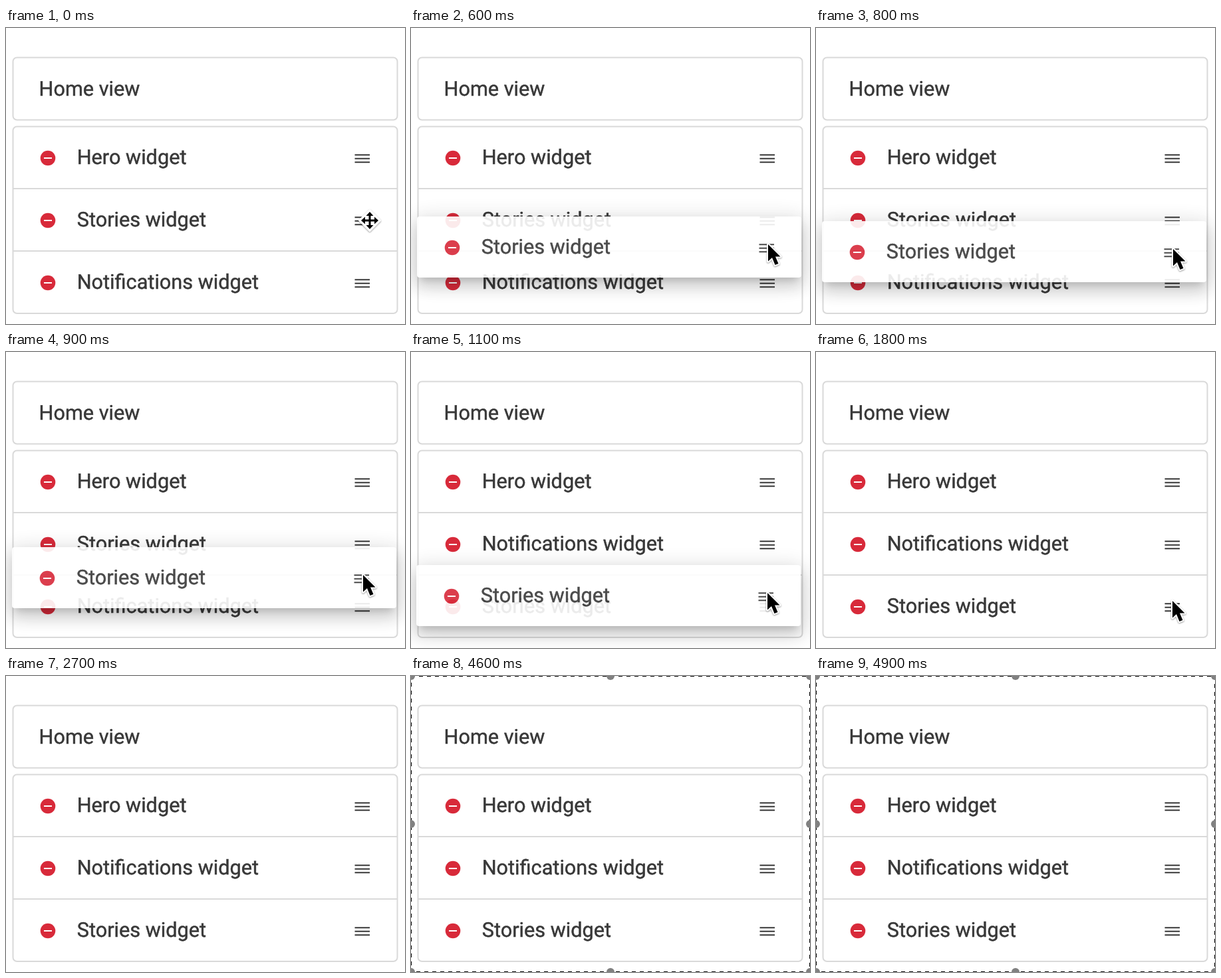
An HTML page that plays this animation: 600x446 px, repeating every 6300 ms.

```html
<!DOCTYPE html>
<html lang="en">
<head>
<meta charset="utf-8">
<title>Reordering widgets</title>
<style>
  html, body { margin: 0; width: 100%; height: 100%; overflow: hidden; background: #fff; }
  svg { display: block; width: 600px; height: 446px; }
  text {
    font: 30.7px Roboto, sans-serif; text-rendering: geometricPrecision;
    fill: #383838; stroke: #383838; stroke-width: .5;
  }
  .line { fill: none; stroke: #d9d9d9; stroke-width: 2; }
  .bars { fill: none; stroke: #383838; stroke-width: 2; }
  .dash { fill: none; stroke: #000; stroke-width: 2; stroke-dasharray: 6 6; }
</style>
</head>
<body>
<svg viewBox="0 0 600 446">
  <defs>
    <g id="controls">
      <circle cx="63" cy="47" r="11.300" fill="#d82a3a"/>
      <path d="M57 47h12" stroke="#fff" stroke-width="2"/>
      <path class="bars" d="M524.500 42.300h22.500M524.500 47.800h22.500M524.500 53.300h22.500"/>
    </g>
  </defs>

  <rect class="line" x="10.500" y="44.500" width="578" height="94" rx="6"/>
  <text x="49.500" y="101.500">Home view</text>
  <rect class="line" x="10.500" y="148.500" width="578" height="281.500" rx="6"/>
  <path class="line" d="M10.500 242h578M10.500 336h578"/>
  <g id="rows"></g>

  <g id="preview" opacity=".9">
    <g id="shadow"></g>
    <rect x="10" y="94" width="578" height="92" rx="4" fill="#fff"/>
  </g>

  <g id="move">
    <path d="M0-16L16 0 0 16-16 0z" fill="#fff" stroke="#fff" stroke-width="2"
      stroke-linejoin="round" style="filter:drop-shadow(0 1px 1px #0006)"/>
    <path d="M-9 0H9M0-9V9" stroke="#000" stroke-width="3"/>
    <g id="heads"></g>
  </g>
  <path id="arrow" d="M0 0V25.500L6 20 10.500 31 15.500 29 11 18.500H18.500Z" stroke="#fff"
    stroke-width="4" paint-order="stroke" stroke-linejoin="round"
    style="filter:drop-shadow(0 1px 1px #0006)"/>

  <g id="frame">
    <rect class="dash" width="600" height="446"/>
  </g>
</svg>
<script>
const LOOP = 6300, SWAP = 1100, DROP = 1200, FRAME = 4600;
const PITCH = 94, ROW_TOP = 149;
const GRAB = { x: 538, y: 285 };

// [time, dx, dy] of the held row
const DRAG = [
  [400, 0, 30], [500, 0, 36], [600, -1, 41], [700, -1, 45],
  [800, -1, 48], [900, -1, 51], [1000, -1, 54], [1100, -2, 78]
];

// [time, cursor, x, y]
const CURSOR = [
  [0, 'move', 547, 290], [100, 'move', 543, 288], [200, 'move', GRAB.x, GRAB.y],
  ...DRAG.map(([t, dx, dy]) => [t, 'arrow', GRAB.x + dx, GRAB.y + dy]),
  [1200, 'arrow', 536, 373], [1300, 'arrow', 536, 375],
  [2500, 'arrow', 541, 388], [2600, 'arrow', 553, 418], [2700, 'none', 0, 0]
];

const $ = id => document.getElementById(id);
const at = (steps, t) => steps.findLast(step => step[0] <= t);
const show = (el, on) => { el.style.display = on ? '' : 'none'; };
const place = (el, x, y) => el.setAttribute('transform', `translate(${x} ${y})`);

function add(parent, tag, attrs = {}, content = '') {
  const el = document.createElementNS('http://www.w3.org/2000/svg', tag);
  for (const [key, value] of Object.entries(attrs)) el.setAttribute(key, value);
  el.textContent = content;
  return parent.appendChild(el);
}

function addRow(parent, label, slot) {
  const row = add(parent, 'g');
  add(row, 'use', { href: '#controls' });
  add(row, 'text', { x: 106.7, y: 55.5 }, label);
  place(row, 0, slot * PITCH);
  return row;
}

place($('rows'), 0, ROW_TOP);
addRow($('rows'), 'Hero widget', 0);
const stories = addRow($('rows'), 'Stories widget', 1);
const notices = addRow($('rows'), 'Notifications widget', 2);
addRow($('preview'), 'Stories widget', 1);

// Layered elevation: offset, blur, spread, alpha
for (const [dy, blur, spread, alpha] of [[10, 10, -6, .12], [12, 22, 2, .14], [6, 36, 5, .13]]) {
  add($('shadow'), 'rect', {
    x: 10 - spread, y: 94 + dy - spread, width: 578 + 2 * spread, height: 92 + 2 * spread,
    rx: 4, opacity: alpha, style: `filter:blur(${blur / 2}px)`
  });
}

for (const turn of [0, 90, 180, 270]) {
  add($('heads'), 'path', { d: 'M0-13L5.500-7H-5.500z', transform: `rotate(${turn})` });
}

for (const cx of [0, 300, 600]) {
  for (const cy of [0, 223, 446]) {
    if (cx !== 300 || cy !== 223) add($('frame'), 'circle', { cx, cy, r: 6, fill: '#808080' });
  }
}

function render(t) {
  const swapped = t >= SWAP;
  place(stories, 0, PITCH * (swapped ? 2 : 1));
  place(notices, 0, PITCH * (swapped ? 1 : 2));

  const held = t < DROP && at(DRAG, t);
  show($('preview'), held);
  if (held) place($('preview'), held[1], ROW_TOP + held[2]);

  const [, kind, x, y] = at(CURSOR, t);
  for (const name of ['move', 'arrow']) {
    show($(name), kind === name);
    place($(name), x, y);
  }
  show($('frame'), t >= FRAME);
}

const start = performance.now();
function tick() {
  render((performance.now() - start) % LOOP);
  requestAnimationFrame(tick);
}
tick();
</script>
</body>
</html>
```
